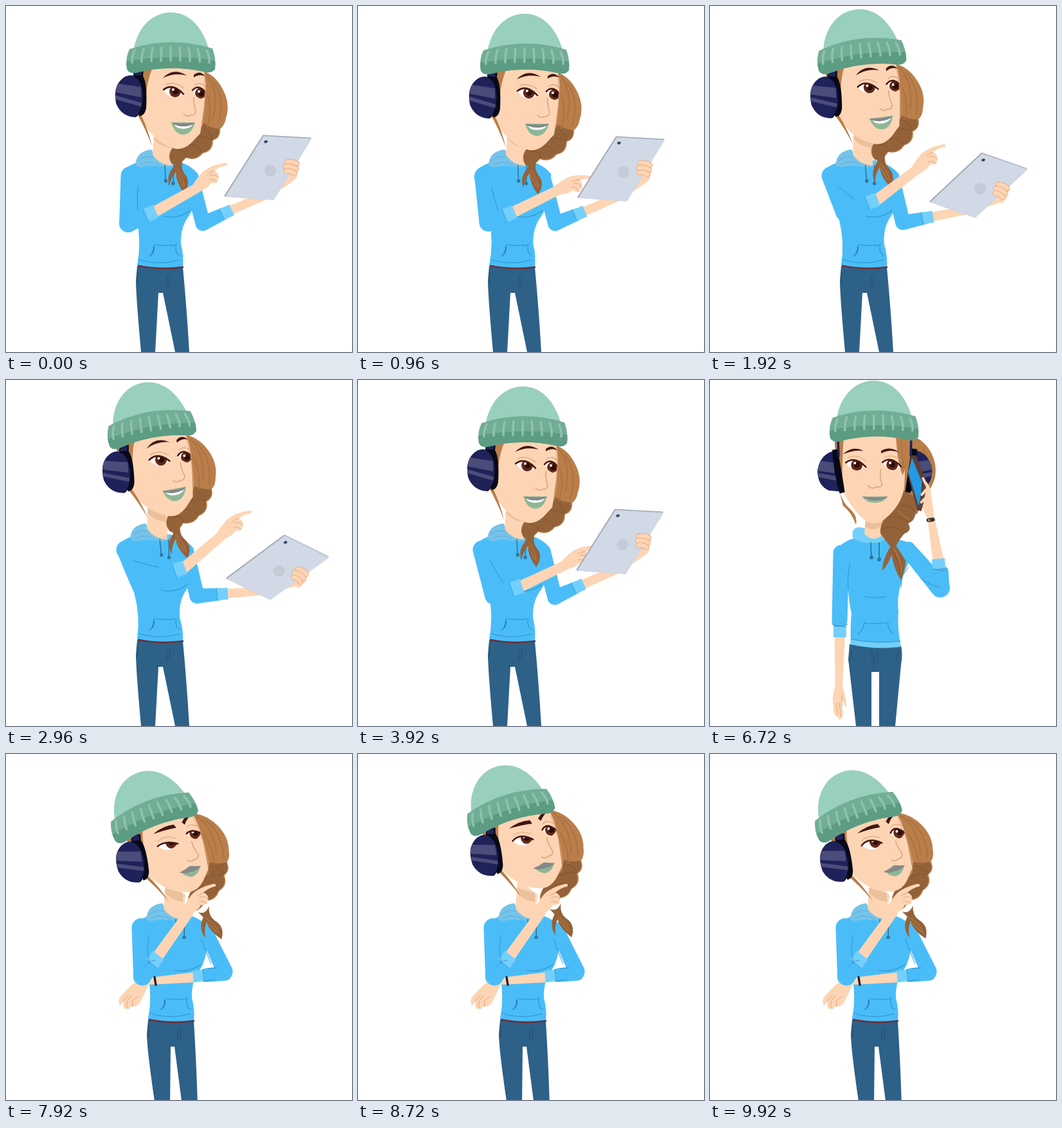
Write an HTML page with a canvas that moves like this. It is 538 by 538 pixels and loops after 10 s.

```html
<!DOCTYPE html>
<html lang="en">
<head>
<meta charset="utf-8">
<title>Three poses</title>
<style>
html, body { margin: 0; width: 100%; height: 100%; overflow: hidden; background: #fff; }
canvas { display: block; width: 538px; height: 538px; }
</style>
</head>
<body>
<canvas id="stage" width="538" height="538"></canvas>
<script>
const ctx = document.getElementById('stage').getContext('2d');
const LOOP = 10000, STEP = 80;
const SKIN = '#fdd5b4', SKIN_SHADE = '#ebc19c', SKIN_LINE = '#dba27c';
const BLUE = '#4abdf8', CUFF = '#73cffb', HOOD = '#77c3e9', FOLD = '#2e93c9', CORD = '#2f7598';
const HAIR = '#b97e4a', HAIR_DARK = '#946239', BROW = '#431512';
const NAVY = '#1f2259', INK = '#070818', STRIPE = '#4b4c79';
const JEANS = '#2e6188', JEANS_LINE = '#244d70';
const OPEN_LEGS = 'M204 404L275 406Q281 470 285 538H263L244 446H237L232 538H210Q202 450 202 426Z';
const CLOSE_LEGS = 'M204 404L275 406Q279 470 281 538H257L245 446H239L238 538H215Q202 450 202 426Z';

function fill(color, d) {
  ctx.fillStyle = color;
  ctx.fill(new Path2D(d));
}

function line(color, width, d) {
  ctx.strokeStyle = color;
  ctx.lineWidth = width;
  ctx.lineCap = ctx.lineJoin = 'round';
  ctx.stroke(new Path2D(d));
}

function oval(color, x, y, rx, ry = rx, turn = 0) {
  ctx.fillStyle = color;
  ctx.beginPath();
  ctx.ellipse(x, y, rx, ry, turn, 0, 7);
  ctx.fill();
}

function group(draw, { x = 0, y = 0, turn = 0, px = 0, py = 0 } = {}) {
  ctx.save();
  ctx.translate(px + x, py + y);
  ctx.rotate(turn * Math.PI / 180);
  ctx.translate(-px, -py);
  draw();
  ctx.restore();
}

const mix = (a, b, k) => a + (b - a) * k;
const mixPoint = (a, b, k) => a.map((v, i) => mix(v, b[i], k));

// Each key is [time, ...values]; values ease between keys.
function track(t, keys) {
  let i = 0;
  while (i < keys.length - 2 && t >= keys[i + 1][0]) i++;
  const [a, b] = [keys[i], keys[i + 1]];
  const k = Math.min(1, Math.max(0, (t - a[0]) / (b[0] - a[0])));
  return mixPoint(a, b, k * k * (3 - 2 * k)).slice(1);
}

function limb(color, a, wa, b, wb) {
  const dir = Math.atan2(b[1] - a[1], b[0] - a[0]), q = Math.PI / 2;
  ctx.fillStyle = color;
  ctx.beginPath();
  ctx.arc(...a, wa / 2, dir + q, dir - q);
  ctx.arc(...b, wb / 2, dir - q, dir + q);
  ctx.fill();
}

function cuff(a, b, width, length) {
  const n = Math.hypot(b[0] - a[0], b[1] - a[1]);
  const [ux, uy] = [(b[0] - a[0]) / n, (b[1] - a[1]) / n];
  const start = [b[0] - ux * length, b[1] - uy * length];
  ctx.lineCap = 'butt';
  ctx.lineWidth = width;
  ctx.strokeStyle = CUFF;
  ctx.beginPath();
  ctx.moveTo(...start);
  ctx.lineTo(...b);
  ctx.stroke();
  const [hx, hy] = [-uy * width / 2, ux * width / 2];
  line(FOLD, 0.8, `M${start[0] + hx} ${start[1] + hy}L${start[0] - hx} ${start[1] - hy}`);
}

function arm(shoulder, elbow, end, wrist, w, wristW = 13) {
  limb(SKIN, end, w * 0.6, wrist, wristW);
  limb(BLUE, shoulder, w, elbow, w * 0.96);
  limb(BLUE, elbow, w * 0.96, mixPoint(elbow, end, 0.72), w * 0.8);
  cuff(elbow, end, w * 0.76, 17);
}

function pointingHand(x, y, turn) {
  group(() => {
    fill(SKIN, 'M-8 -3Q3 -20 11 -27Q24 -36 43 -39Q49 -39 46 -35Q36 -34 27 -27Q36 -22 33 -13Q30 -6 22 -8Q17 0 6 5L0 8Z');
    line(SKIN_LINE, 0.9, 'M27 -27Q20 -25 16 -21M33 -17Q27 -23 20 -19M31 -9Q25 -16 19 -12');
  }, { x, y, turn });
}

function hat() {
  fill('#99cfbd', 'M198 72C202 36 226 10 256 10C287 10 307 36 316 69Z');
  const band = 'M192 67Q256 46 321 66Q327 82 325 98Q319 106 307 102Q256 91 206 103Q192 107 188 98Q185 82 192 67Z';
  fill('#72ad96', band);
  ctx.save();
  ctx.clip(new Path2D(band));
  fill('#5c9c82', 'M180 88Q256 72 330 86V110H180Z');
  for (let i = 0; i < 9; i++) {
    const k = (i - 4) / 4, x = 256 + k * 58;
    const y = 64 + k * k * 5;
    line('#8fc2ae', 3.5, `M${x - k * 2} ${y}Q${x + k * 3} ${y + 10} ${x + k * 2} ${y + 21 - k * k * 2}`);
  }
  ctx.restore();
}

function eye(x, y, w, h, open, irisX, irisY) {
  const top = y - h * (2.1 * open - 0.7);
  const shape = `M${x - w} ${y - 3}Q${x - w * 0.1} ${top - 3} ${x + w} ${y + 3}Q${x + w * 0.4} ${y + h} ${x} ${y + h}Q${x - w * 0.7} ${y + h * 0.7} ${x - w} ${y - 3}Z`;
  fill('#fff', shape);
  ctx.save();
  ctx.clip(new Path2D(shape));
  oval('#632817', irisX, irisY, 9);
  oval('#2a0d0a', irisX + 0.5, irisY, 4.5);
  oval('#fff', irisX - 3, irisY - 3, 2);
  ctx.restore();
  line(BROW, 2.5, `M${x - w - 1} ${y - 4}Q${x - w * 0.1} ${top - 3} ${x + w} ${y + 3}`);
  line(SKIN_LINE, 1.1, `M${x - w + 2} ${y - h - 3}Q${x} ${y - h * 1.9 - 2} ${x + w} ${y - h + 2}`);
}

function smile(x, y, w, h) {
  fill('#8db796', `M${x - w} ${y}Q${x - w * 0.7} ${y + h} ${x} ${y + h}Q${x + w * 0.7} ${y + h} ${x + w} ${y}Z`);
  fill('#fff', `M${x - w * 0.75} ${y + 4}H${x + w * 0.8}Q${x + w * 0.5} ${y + h * 0.52} ${x} ${y + h * 0.52}Q${x - w * 0.5} ${y + h * 0.52} ${x - w * 0.75} ${y + 4}Z`);
  fill('#858889', `M${x - w} ${y}Q${x} ${y + 3} ${x + w} ${y}Q${x + w * 0.6} ${y + 7} ${x} ${y + 6}Q${x - w * 0.5} ${y + 7} ${x - w} ${y}Z`);
}

function sideHeadphone() {
  fill(INK, 'M201 100L214 99L213 109Q220 121 218 158Q216 171 207 171L198 106Z');
  fill(NAVY, 'M203 98L211 98L211 108L199 108Z');
  const cup = 'M197 108Q212 113 214 139Q213 166 201 173Q179 172 171 151Q166 124 182 112Q189 107 197 108Z';
  fill(NAVY, cup);
  ctx.save();
  ctx.clip(new Path2D(cup));
  fill(STRIPE, 'M164 119L210 126V142L164 133Z');
  fill(STRIPE, 'M164 137L212 151V157L164 143Z');
  ctx.restore();
  line(INK, 1.3, 'M199 109Q213 115 213 140Q212 164 202 172');
}

function turnedHead({ open = 1, pensive = false }, turn) {
  // hair and braid
  fill(HAIR, 'M298 98Q322 104 334 124Q350 150 342 174Q340 186 333 191Q334 205 322 209Q322 226 306 229Q296 242 280 236Q272 247 258 246Q247 230 264 215L300 190Z');
  fill(HAIR_DARK, 'M307 182Q318 190 331 191Q333 205 320 208Q321 225 305 228Q295 240 280 235Q271 246 258 245Q249 230 264 216L300 198Z');
  line('#a87040', 1.5, 'M313 108Q332 134 322 174M322 117Q342 144 330 184M314 140Q321 165 312 190');
  line('#7f522f', 1, 'M294 204Q310 201 320 208M281 216Q298 213 305 228M265 224Q282 222 280 235M310 190Q324 202 320 208');
  group(() => {
    fill(HAIR_DARK, 'M257 239Q267 247 276 236Q270 250 277 260Q289 274 277 291Q264 274 264 258Q256 267 254 281Q248 263 262 249Z');
    line(HAIR, 1, 'M266 253Q276 266 277 281M264 257Q270 268 274 279');
  }, pensive ? { x: 7, y: 10 } : {});
  fill(HAIR, 'M196 96H232L222 152L207 150Z');

  // face
  const rise = pensive ? 7 : 0;
  fill(SKIN, `M230 92Q218 116 217 150L207 ${168 - rise}Q217 ${191 - rise} 232 ${205 - rise}Q247 ${218 - rise} 263 ${222 - rise}Q276 ${224 - rise} 288 ${213 - rise}L302 ${198 - rise}Q308 160 310.5 130Q311 110 306 94Z`);
  fill(HAIR, 'M204 168L210 169Q221 192 227 218Q217 191 204 168Z');
  line(SKIN_LINE, 0.9, 'M308 109Q312 150 305 186');
  if (pensive) eye(256, 135, 15, 8, open, 262, 133);
  else eye(261, 134, 15, 8.5, open, 263, 133);
  ctx.save();
  ctx.clip(new Path2D('M280 95H308Q312 130 307 160H280Z'));
  if (pensive) eye(300, 132, 10, 9, open, 302, 132);
  else eye(302, 135, 11, 9, open, 303, 136);
  ctx.restore();
  if (pensive) {
    fill(BROW, 'M240 111Q258 104 275 108L277 114Q260 111 240 111Z');
    fill(BROW, 'M288 109Q296 100 307 103Q298 105 291 114Z');
  } else {
    fill(BROW, 'M244 112Q260 95 281 108Q261 103 244 112Z');
    fill(BROW, 'M292 107Q301 99 310 109Q300 105 292 111Z');
  }
  line(SKIN_LINE, 1.5, 'M292 142Q291 151 295 164Q294 171 286 170Q281 173 276 168');
  if (pensive) {
    fill('#8db796', 'M262 184Q273 187 291 184Q285 194 274 194Q265 190 262 184Z');
    fill('#858889', 'M258 181Q268 180 277 177Q284 180 293 183Q284 188 274 186Q265 187 258 181Z');
  } else {
    smile(275.5, 181, 18.5, 19);
  }

  group(sideHeadphone, { turn: -turn * 0.55, px: 192, py: 140 });
  group(hat, pensive ? { x: -7, y: 3 } : {});
}

function turnedBody(lean, legs) {
  fill(JEANS, legs);
  line(JEANS_LINE, 1, 'M255 418L254 433Q251 438 250 436V421M205 413Q206 425 203 434');
  ctx.save();
  ctx.transform(1, 0, lean, 1, -lean * 405, 0);
  fill(BLUE, 'M202 244Q180 252 179 266Q189 296 203 331Q211 367 204 403Q240 412 275 405Q277 390 272 370Q271 344 284 327Q296 311 299 262Q287 246 262 240Z');
  fill(HOOD, 'M201 248Q202 226 226 223Q236 242 262 240Q266 250 250 251Q226 246 209 251Z');
  fill(SKIN, 'M231 185L228 231Q238 247 258 248L262 210Z');
  fill(SKIN_SHADE, 'M231 199L230 207Q241 219 258 221V207Z');
  line('#5caedb', 1, 'M206 241Q217 231 228 236M209 246Q225 239 238 247');
  line(CORD, 1.6, 'M247 248L248 270M261 248L260 275');
  oval(CORD, 248.3, 272, 2.7);
  oval(CORD, 260, 276, 2.7);
  line(FOLD, 1.1, 'M245 327Q268 332 286 318');
  ctx.restore();
  line(FOLD, 1.1, 'M231 371Q249 374 266 371M264 373Q263 384 270 388M207 394Q236 404 270 395');
  fill('#317fae', 'M229 374Q229 385 221 390Q232 387 231 372Z');
  line('#6c3035', 2.7, 'M206 404Q240 411 275 406');
}

function placeHead([x, y, turn], look) {
  group(() => turnedHead(look, turn), { x, y, turn, px: 250, py: 230 });
}

function tablet(k, dx, dy) {
  const [a, b, c, d] = [
    mixPoint([400, 202], [433, 242], k), mixPoint([473, 206], [500, 275], k),
    mixPoint([415, 300], [410, 340], k), mixPoint([341, 295], [344, 308], k)
  ];
  group(() => {
    const outline = `M${a}L${b}L${c}L${d}Z`;
    line('#a5acb8', 3, outline);
    ctx.translate(1, 1);
    fill('#d1d8e6', outline);
    line('#d1d8e6', 1.6, outline);
    ctx.translate(-1, -1);
    oval('#3b4563', ...mixPoint([404, 211], [434.5, 252.5], k), 2.9, 2.1, -0.3);
    oval('#c3cbd7', ...mixPoint([411, 256], [424.5, 297], k), 9);
  }, { x: dx, y: dy });
}

function tabletScene(t) {
  const bob = (1 - Math.cos(t * Math.PI / 1000)) / 2;
  const [k] = track(t, [[1450, 0], [2200, 1], [3180, 1], [3800, 0]]);
  const sx = bob * 1.8 * (1 - k), sy = bob * 2 * (1 - k);

  const farElbow = mixPoint([306 + sx * 0.4, 338], [297, 336], k);
  const farCuff = mixPoint([351 + sx, 317 + sy], [345, 332], k);
  const farWrist = mixPoint([402 + sx, 295 + sy], [398, 328], k);
  const palm = mixPoint([441 + sx, 262 + sy], [456, 307], k);
  limb(SKIN, farWrist, 13, palm, 23);
  arm(mixPoint([288, 268], [281, 270], k), farElbow, farCuff, farWrist, 24);

  turnedBody(0.05 * k - sx * 0.006, OPEN_LEGS);
  placeHead([sx * 1.6 - 5 * k, sy - 8 * k, -10 * k], {});

  const [sX, sY, eX, eY, cX, cY, wX, wY, turn] = track(t, [
    [0, 193, 264, 190, 338, 233, 319, 297, 283, 0],
    [420, 192, 264, 179, 336, 222, 317, 287, 278, -8],
    [900, 195, 264, 202, 336, 243, 319, 310, 286, 20],
    [1060, 195, 264, 202, 336, 243, 319, 310, 286, 20],
    [1500, 192, 264, 185, 337, 229, 318, 294, 279, -4],
    [2200, 186, 264, 222, 311, 278, 291, 335, 242, 0],
    [3180, 186, 264, 222, 311, 278, 291, 335, 242, 0],
    [3840, 193, 264, 211, 335, 255, 320, 322, 288, 11],
    [4000, 193, 264, 211, 335, 255, 320, 322, 288, 11]
  ]);
  group(() => {
    arm([sX, sY], [eX, eY], [cX, cY], [wX, wY], 29, 15);
    line(FOLD, 1, `M${sX + 12} ${sY + 17}Q${mix(sX, eX, 0.6) + 12} ${mix(sY, eY, 0.5)} ${eX + 15} ${eY - 20}`);
    pointingHand(wX, wY, turn);
  }, { x: sx * 0.3, y: sy * 0.3 });

  tablet(k, sx, sy);
  const [gx, gy] = mixPoint([444 + sx, 251 + sy], [457, 304], k);
  group(() => {
    limb(SKIN, [8, -3], 7, [3, 13], 11);
    for (const finger of ['M-7 -8Q1 -10 8 -6', 'M-9 -1Q0 -3 7 2', 'M-8 6Q-1 5 4 9']) {
      line(SKIN_LINE, 8.6, finger);
      line(SKIN, 7, finger);
    }
  }, { x: gx, y: gy, turn: 22 * k });
}

function frontHead(mouth) {
  fill(HAIR, 'M288 80Q328 84 344 112Q356 135 349 157Q342 176 331 182Q329 198 322 209L285 210Z');
  fill(HAIR_DARK, 'M302 172Q318 184 330 182Q331 198 320 205Q319 220 308 223Q315 235 302 239Q295 247 289 258Q299 273 304 282Q302 298 296 311Q285 293 282 272Q276 288 267 297Q268 279 280 259L265 239Q263 222 280 204Z');
  line('#7f522f', 1, 'M288 198Q310 190 320 206M273 214Q298 210 308 223M269 231Q286 224 302 239M282 260Q289 274 295 295');
  line(HAIR, 1.2, 'M285 262Q297 279 297 298M292 203L309 217');
  fill(HAIR, 'M201 170Q206 191 220 202Q230 212 227 225Q220 205 207 195Z');
  fill(HAIR, 'M194 80H215L207 150L198 150Z');
  fill(SKIN, 'M210 78Q205 130 207 172Q222 202 238 215Q258 227 272 216Q297 196 302 170Q307 130 296 78Z');
  fill(HAIR, 'M290 78Q291 125 300 148Q305 142 306 113L314 80Z');
  line('#a87040', 1.2, 'M299 94Q298 120 303 138M330 103Q348 135 335 172');
  eye(228, 132, 15, 8.5, 1, 229, 132);
  eye(284, 132, 14, 8.5, 1, 284, 132);
  fill(BROW, 'M208 115Q222 101 240 110Q224 108 208 115Z');
  fill(BROW, 'M267 110Q282 102 295 113Q282 107 267 114Z');
  line(SKIN_LINE, 1.5, 'M266 139Q264 150 268 162Q266 168 259 166Q253 171 246 164');
  smile(257, 181, 20, mouth);

  const headphone = () => {
    const cup = 'M198 109Q173 112 168 139Q167 163 185 171L203 173Z';
    fill(NAVY, cup);
    ctx.save();
    ctx.clip(new Path2D(cup));
    fill(STRIPE, 'M160 123L206 130V146L160 139Z');
    fill(STRIPE, 'M160 142L206 151V158L160 148Z');
    ctx.restore();
    fill(INK, 'M191 108L199 107Q205 138 210 174L202 176Q193 145 191 108Z');
    line(NAVY, 3.5, 'M200 90L201 118');
  };
  headphone();
  ctx.save();
  ctx.translate(514, 0);
  ctx.scale(-1, 1);
  headphone();
  ctx.restore();
  group(hat, { y: -9 });
}

function phoneScene(t) {
  const u = (t - 4000) / 1000;
  const sway = Math.sin((u - 1.28) * Math.PI * 1.25);
  fill(JEANS, 'M217 411L297 413Q300 426 297 443L288 538H263V454H251V538H227L215 434Z');
  line(JEANS_LINE, 1, 'M252 420Q250 440 257 452M261 422V440Q257 446 256 440V425M220 420Q221 431 216 437M294 422L290 435');

  group(() => {
    limb(SKIN, [201, 399], 16, [199, 482], 11);
    fill(SKIN, 'M194 475Q187 493 191 511Q190 522 198 525Q199 530 204 526Q207 521 204 508L204 496Q210 511 211 508Q210 491 205 476Z');
    line(SKIN_LINE, 0.9, 'M195 503L197 520M200 502L202 523M204 488V507');
    limb(BLUE, [204, 269], 25, [201, 374], 24);
    cuff([202, 350], [201, 400], 20, 17);
    line(FOLD, 1, 'M189 379Q201 386 213 380');
  }, { turn: sway * 0.5, px: 205, py: 265 });

  limb(BLUE, [308, 264], 25, [358, 323], 30);
  fill(BLUE, 'M204 256Q227 240 247 247H279Q306 248 319 259L304 295Q289 334 293 360Q291 381 296 412Q257 419 219 409Q218 385 220 363Q213 332 214 289Q206 269 204 256Z');
  fill(CUFF, 'M219 403Q257 411 296 406L296 415Q257 420 218 411Z');
  line(FOLD, 1, 'M218 285Q213 301 215 326M219 403Q257 411 296 406M240 337Q257 340 273 337M309 291L299 304L297 322');
  line(FOLD, 1.2, 'M240 378Q258 380 278 377M240 376Q239 390 230 395M276 377Q277 388 285 394');
  fill(CUFF, 'M222 245Q219 229 233 229L277 236Q276 248 263 253H242Q231 253 222 245Z');
  fill(SKIN, 'M242 207L240 239Q253 254 270 240L271 207Z');
  fill(SKIN_SHADE, 'M242 219Q257 227 270 218V226Q254 237 241 228Z');
  line(CORD, 1.7, 'M250 253L251 275M263 253L263 278');
  oval(CORD, 251, 276, 3);
  oval(CORD, 263, 279, 3);

  const talk = 14 + 4.5 * Math.cos((u - 1.28) * 15);
  group(() => frontHead(talk), { y: 0.7 - 0.7 * Math.cos((u - 1.28) * 4), turn: sway * 0.8, px: 257, py: 225 });

  group(() => {
    limb(SKIN, [355, 280], 17, [344, 214], 11);
    limb(BLUE, [358, 323], 29, [360, 299], 22);
    cuff([359, 320], [355, 278], 20, 16);
    line(FOLD, 0.9, 'M348 293Q359 300 369 294M328 309Q345 320 357 322');
    fill(SKIN, 'M339 216Q333 204 327 190Q323 171 329 158Q337 151 343 169Q347 192 349 215Z');
    line('#3d302c', 6, 'M340 218L347 217');
    oval('#a48e79', 341, 218, 2);
    fill('#5c4038', 'M314 117L321 117L337 158Q336 181 329 204L323 202L308 146Z');
    fill('#239be4', 'M315 121L330 158Q329 180 325 196L309 143Z');
    line(SKIN, 4, 'M332 153L337 163M330 178L336 171M329 190L336 183');
  }, { turn: sway * 0.4, px: 358, py: 325 });
}

function thinkingScene(t) {
  const head = track(t, [
    [7000, 12, -13, -17], [7700, 12, -6, -20], [8050, 12, -6, -20],
    [8400, 12, -12, -17], [8800, 12, -12, -17], [9300, 12, -7, -20], [10000, 12, -7, -20]
  ]);
  const [open] = track(t, [[7000, 0.95], [7650, 0.65], [8150, 0.65], [8500, 0.95], [10000, 0.95]]);

  limb(BLUE, [309, 272], 21, [340, 338], 25);
  group(() => turnedBody(0, CLOSE_LEGS), { x: 17, y: 9 });
  // folded arm
  limb(SKIN, [294, 347], 16, [226, 353], 11);
  fill(SKIN, 'M226 347Q206 349 193 361L177 378Q173 389 178 391L182 385Q181 398 188 396Q189 400 194 393Q207 394 212 379L222 359Z');
  line(SKIN_LINE, 0.9, 'M182 385L190 375M188 394Q186 382 196 375M196 393L197 383L206 377');
  line('#25252d', 3.4, 'M231 347L233 359');
  limb(BLUE, [340, 341], 23, [310, 344], 21);
  cuff([340, 341], [291, 346], 18, 16);
  line(FOLD, 1, 'M304 288Q312 310 319 326M314 334L328 332M308 353L325 351');

  group(() => placeHead(head, { open, pensive: true }), { x: 17, y: 9 });

  // arm to the chin
  arm([210, 270], [212, 346], [237, 313], [284, 247], 29, 15);
  line(FOLD, 1, 'M222 282Q218 309 223 325M213 332Q228 319 232 321');
  pointingHand(282, 244, -4);
}

function draw(t) {
  ctx.fillStyle = '#fff';
  ctx.fillRect(0, 0, 538, 538);
  if (t < 4000) tabletScene(t);
  else if (t < 7000) phoneScene(t);
  else thinkingScene(t);
}

const start = performance.now();
function tick() {
  const t = (performance.now() - start) % LOOP;
  draw(Math.floor(t / STEP) * STEP);
  requestAnimationFrame(tick);
}
tick();
</script>
</body>
</html>
```
